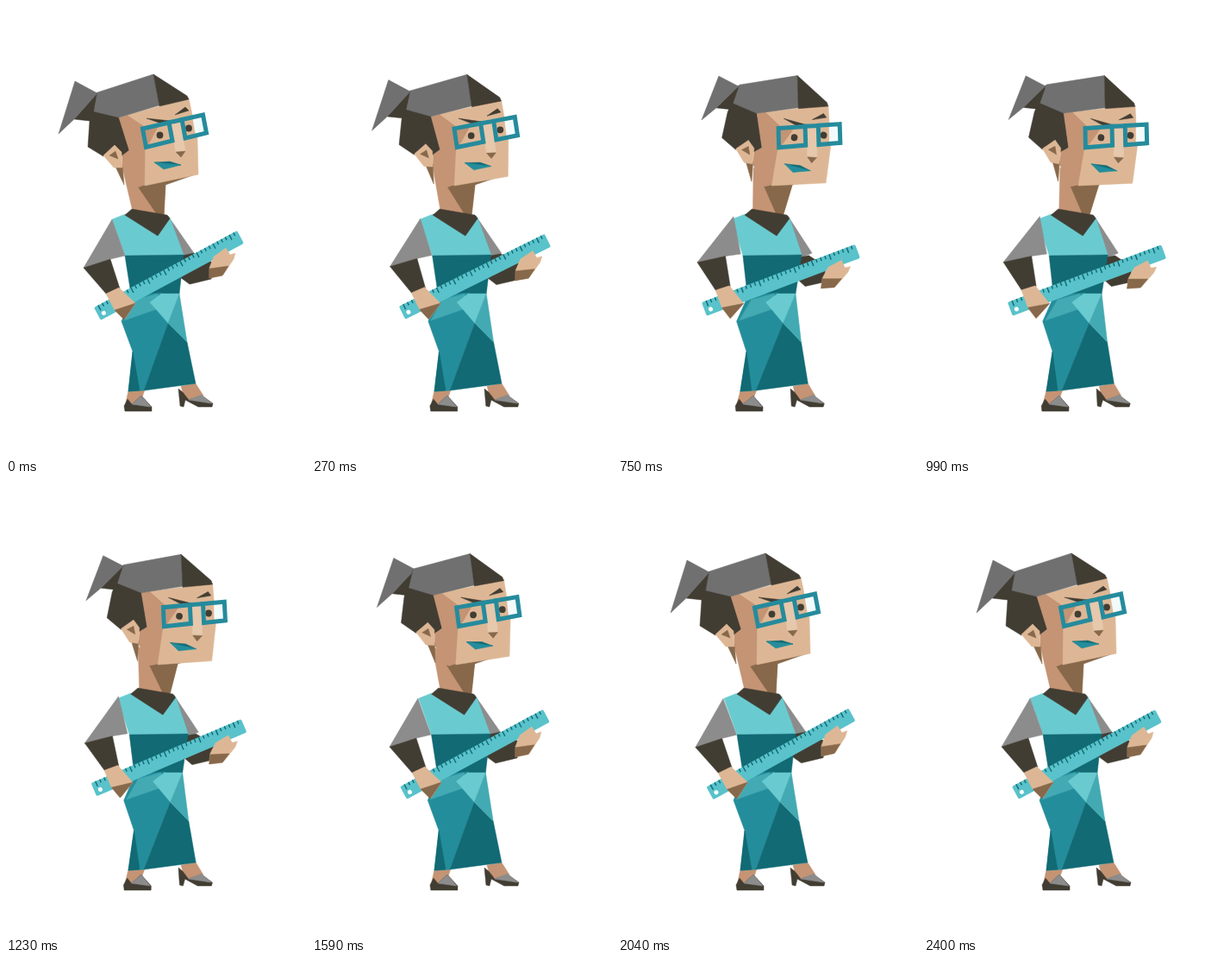
These frames come from a looping animation (348 by 522 pixels, 3 s). An HTML page:

```html
<!DOCTYPE html>
<html lang="en">
<head>
<meta charset="utf-8">
<title>Woman with ruler</title>
<style>
html, body { margin: 0; width: 100%; height: 100%; overflow: hidden; background: #fff; }
svg { display: block; width: 348px; height: 522px; }
polygon { fill: var(--c); stroke: var(--c); stroke-width: .5; stroke-linejoin: round; }
.light { --c: #69cbd0; }
.soft { --c: #43a9b2; }
.mid { --c: #248d9b; }
.deep { --c: #116a74; }
.dark { --c: #423d33; }
.hair { --c: #707070; }
.grey { --c: #8c8c8c; }
.skin { --c: #ddb795; }
.side { --c: #c49474; }
.brown { --c: #87684a; }
.nose { --c: #e6c8ac; }
.lens { --c: #f2fbfb; }
.rim { fill: none; stroke: #258b9c; stroke-width: 5; stroke-linejoin: miter; }
</style>
</head>
<body>
<svg viewBox="0 0 348 522">
  <!-- legs and shoes -->
  <g data-move="body">
    <polygon class="side" points="142,445 161,444 158,453 146,462 139,459"/>
    <polygon class="dark" points="141,455 146,461 157,451 169,464 169,469 138,469 137,463"/>
    <polygon class="grey" points="146,461 157,451 168,464"/>
    <polygon class="side" points="203,440 220,437 229,451 211,457 205,447"/>
    <polygon class="dark" points="200,443 205,447 212,456 227,451 240,460 239,464 223,464 208,456 206,464 202,463"/>
    <polygon class="grey" points="212,456 227,450 239,460"/>
    <polygon class="grey" points="188,243 218,286 206,291"/>
  </g>
  <g data-move="far">
    <polygon class="dark" points="204,289 218,286 242,298 238,316 213,322 202,314"/>
  </g>
  <g data-move="neck">
    <polygon class="side" points="135,187 160,200 185,206 183,244 172,252 147,238"/>
    <polygon class="brown" points="153,209 222,194 185,207 183,244 175,241"/>
  </g>
  <!-- dress -->
  <g data-move="body">
    <polygon class="light" points="138,241 190,245 206,288 138,289 123,247"/>
    <polygon class="dark" points="146,235 187,242 190,246 176,266 138,242"/>
    <polygon class="deep" points="138,289 206,288 201,333 146,340"/>
    <polygon class="mid" points="146,335 181,332 188,367 160,445 142,446 147,400 134,365"/>
    <polygon class="deep" points="147,400 155,445 142,446"/>
    <polygon class="deep" points="188,367 210,389 220,437 160,445"/>
    <polygon class="soft" points="137,364 150,340 176,333 180,349"/>
    <polygon class="light" points="167,343 180,333 201,333 188,367"/>
    <polygon class="soft" points="201,333 210,389 188,367"/>
  </g>
  <g data-move="near">
    <polygon class="grey" points="123,247 138,289 121,293 90,303"/>
    <polygon class="dark" points="90,303 121,293 132,327 117,334"/>
  </g>
  <g data-move="ruler">
    <g id="ruler" transform="translate(102 349) rotate(-28.2)">
      <rect width="188.4" height="16.7" rx="2" fill="#59c2ca"/>
      <circle cx="7" cy="11" r="2.5" fill="#fff"/>
    </g>
    <polygon class="skin" points="116,333 131,326 150,344 138,362 126,352"/>
    <polygon class="brown" points="126,352 150,344 137,363"/>
    <polygon class="skin" points="236,303 241,290 255,280 260,288 266,286 264,293 252,311 236,315"/>
    <polygon class="brown" points="236,304 258,301 251,312 236,315"/>
  </g>
  <g data-move="tail">
    <polygon class="dark" points="106,100 104,123 97,133 79,131"/>
    <polygon class="hair" points="80,87 106,101 79,131 61,148"/>
  </g>
  <g data-move="head">
    <polygon class="dark" points="106,100 131,128 143,167 135,174 126,161 113,174 95,163 97,133"/>
    <polygon class="side" points="131,129 141,126 162,140 163,206 153,210 135,187 135,173 143,167"/>
    <polygon class="skin" points="141,126 212,107 222,154 223,195 161,208 162,140"/>
    <polygon class="brown" points="127,186 135,184 137,207"/>
    <polygon class="skin" points="113,173 126,161 134,169 135,187 125,187"/>
    <polygon class="brown" points="120,173 127,168 130,177"/>
    <polygon class="hair" points="106,100 171,79 178,115 131,129 102,122"/>
    <polygon class="dark" points="171,79 210,104 212,108 178,116"/>
    <!-- brows, eyes, nose -->
    <polygon class="dark" points="163,130 191,133 183,137"/>
    <polygon class="dark" points="196,126 208,117 212,121"/>
    <polygon class="side" points="161,143 176,140 165,161"/>
    <polygon class="lens" points="217,131 228,127 231,146 220,149"/>
    <circle cx="178.5" cy="149.5" r="3.9" fill="#423d33"/>
    <circle cx="212" cy="141.5" r="3.9" fill="#423d33"/>
    <polygon class="nose" points="192,136 203,134 208,168 197,170"/>
    <polygon class="brown" points="197,169 208,168 203,175"/>
    <!-- glasses and mouth -->
    <polygon class="rim" points="158.5,142 189,135 193,156 162.5,163.5"/>
    <polygon class="rim" points="204,131.5 228.5,126 232.5,147 208,153"/>
    <path class="rim" d="M188 135L205 131.5"/>
    <polygon class="deep" points="172,181 190,180 203,184 180,185"/>
    <polygon class="mid" points="172,181 203,184 183,189"/>
  </g>
</svg>
<script>
const LOOP = 3000, STEP = 30;
const RISE = 850, TURN = 960, REACH = 1.03;

// Shift at full lean: dx and dy, each as [constant, per x, per y].
// fall is the time the part takes to swing back.
const moves = {
  body:  { fall: 760,  dx: [20, 0, -.045],       dy: [0, 0, 0] },
  neck:  { fall: 900,  dx: [69, 0, -.25],        dy: [0, 0, 0] },
  head:  { fall: 1020, dx: [52.9, -.02, -.155],  dy: [-25.8, .16, 0] },
  tail:  { fall: 1100, dx: [48.4, -.093, -.045], dy: [7.8, .005, -.163] },
  near:  { fall: 680,  dx: [50.5, 0, -.16],      dy: [-14.4, .09, 0], dip: .1 },
  far:   { fall: 680,  dx: [38.3, -.16, 0],      dy: [-8.1, .05, 0], dip: .1 },
  ruler: { fall: 680,  dx: [42.1, 0, -.135],     dy: [-19.5, .1325, 0], dip: .1 }
};

const clamp = u => Math.min(1, Math.max(0, u));
const ease = u => (1 - Math.cos(Math.PI * clamp(u))) / 2;

function lean(t, { fall, dip = 0 }) {
  const swing = t < TURN ? ease(t / RISE) : 1 - ease((t - TURN) / fall);
  return REACH * swing - dip * Math.sin(Math.PI * clamp((t - 1500) / 900));
}

function matrix(t, move) {
  const k = lean(t, move);
  const [x0, xx, xy] = move.dx.map(v => v * k);
  const [y0, yx, yy] = move.dy.map(v => v * k);
  return `matrix(${[1 + xx, yx, xy, 1 + yy, x0, y0].map(v => v.toFixed(5))})`;
}

// Ruler marks
const marks = 34;
for (let i = 0; i < marks; i++) {
  const mark = document.createElementNS('http://www.w3.org/2000/svg', 'path');
  mark.setAttribute('d', `M${5.5 + i * 178 / (marks - 1)} 0v${i % 4 ? 4 : 6.5}`);
  mark.setAttribute('stroke', '#116a74');
  mark.setAttribute('stroke-width', 1.4);
  document.getElementById('ruler').append(mark);
}

const groups = [...document.querySelectorAll('[data-move]')];
const start = performance.now();
function tick() {
  const t = Math.floor((performance.now() - start) % LOOP / STEP) * STEP;
  for (const g of groups) g.setAttribute('transform', matrix(t, moves[g.dataset.move]));
  requestAnimationFrame(tick);
}
tick();
</script>
</body>
</html>
```
